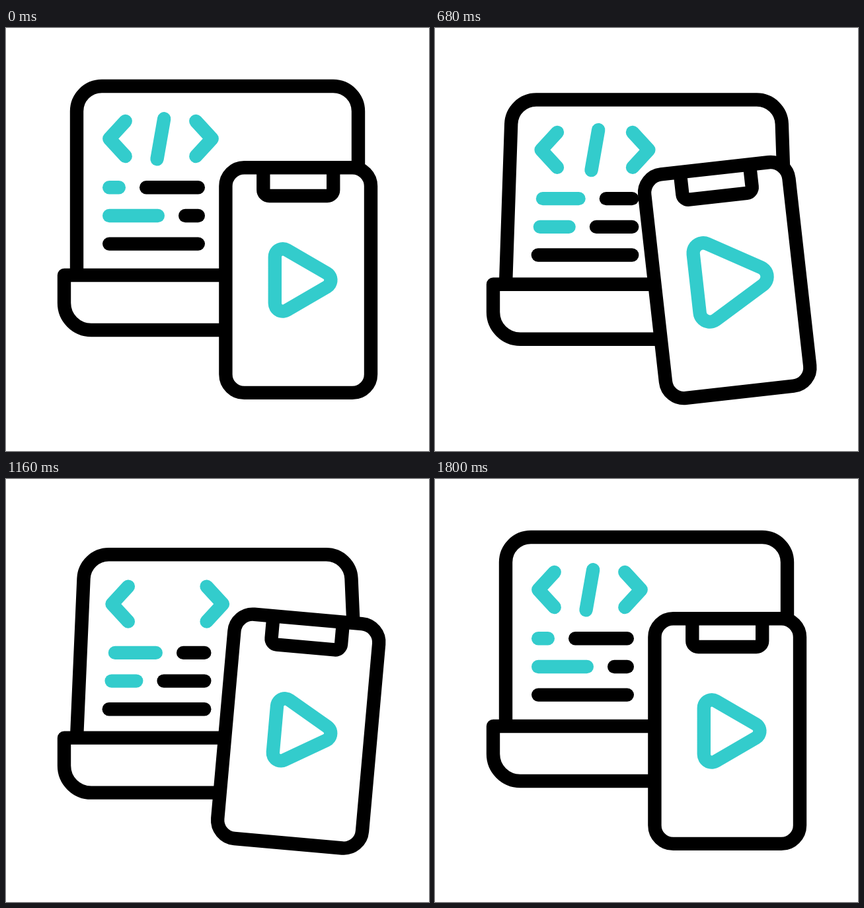
Write an HTML page with a canvas that moves like this. It is 640 by 640 pixels and loops after 2 s.

```html
<!DOCTYPE html>
<html lang="en">
<head>
<meta charset="utf-8">
<title>Code on laptop and phone</title>
<style>
  html, body { margin: 0; height: 100%; overflow: hidden; background: #fff; }
  canvas { display: block; width: 100vmin; height: 100vmin; }
</style>
</head>
<body>
<canvas id="stage" width="640" height="640"></canvas>
<script>
const ctx = document.getElementById('stage').getContext('2d');
const LOOP = 2000, STEP = 40, WEIGHT = 20.4;
const BLACK = '#000', TEAL = '#33cccc', WHITE = '#fff';

const smooth = u => u * u * (3 - 2 * u);
const smoother = u => u * u * u * (10 - 15 * u + 6 * u * u);

// Keyframes are [time, value] pairs, eased between neighbours.
const tiltKeys = [[170, 0], [985, 1], [1800, 0]];
const textKeys = [[140, 0], [970, 1], [1800, 0]];
const swingKeys = [[120, 0], [370, 8], [730, -7.2], [1070, 7.2], [1320, 0]];
const playKeys = [[120, 1], [500, 1.32], [540, 1.32], [1100, 1]];
const slashKeys = [[880, 1], [1080, 0], [1200, 0], [1400, 1]];

function track(keys, t, ease) {
  const next = keys.findIndex(key => t < key[0]);
  if (next === 0) return keys[0][1];
  if (next < 0) return keys[keys.length - 1][1];
  const [t0, a] = keys[next - 1], [t1, b] = keys[next];
  return a + (b - a) * ease((t - t0) / (t1 - t0));
}

function stroke(color, width = WEIGHT) {
  ctx.strokeStyle = color;
  ctx.lineWidth = width;
  ctx.stroke();
}

function polyline(color, ...points) {
  ctx.beginPath();
  points.forEach(([x, y]) => ctx.lineTo(x, y));
  stroke(color);
}

// A round-capped bar given by its outer left and right edges.
function bar(color, left, right, y) {
  const cap = WEIGHT / 2;
  polyline(color, [left + cap, y], [right - cap, y]);
}

function drawLaptop(tilt) {
  const hinge = 374 + 19 * tilt, top = 88 + 28.3 * tilt, lean = 13 * tilt;
  ctx.lineCap = 'butt';
  ctx.beginPath();
  ctx.moveTo(107, hinge);
  ctx.arcTo(107 + lean, top, 320, top, 38);
  ctx.arcTo(533 - lean, top, 533, hinge, 38);
  ctx.lineTo(533, hinge);
  stroke(BLACK);

  ctx.beginPath();
  ctx.moveTo(345, hinge);
  ctx.lineTo(88, hinge);
  ctx.arcTo(88, hinge + 83, 345, hinge + 83, 41);
  ctx.lineTo(345, hinge + 83);
  stroke(BLACK);
}

function drawCode(tilt, shift, slash) {
  const dy = 23.2 * tilt, dx = 11 * tilt, spread = 7 * tilt * tilt;
  const right = 301 + 10.2 * tilt;
  ctx.lineCap = 'round';

  const chevron = (x, tip) => polyline(TEAL,
    [x, 141 + dy], [x + tip, 167.5 + dy], [x, 194 + dy]);
  chevron(180.7 + dx - spread, -24.4);
  chevron(287.3 + dx + spread, 24.4);
  if (slash > 0) {
    polyline(TEAL, [228.5 + dx, 198.3 + dy],
      [228.5 + 10.7 * slash + dx, 198.3 - 61 * slash + dy]);
  }

  bar(TEAL, 146 + 9.4 * tilt, 181 + 61 * shift, 241.3 + dy);
  bar(BLACK, 202 + 61 * shift, right, 241.3 + dy);
  bar(TEAL, 146 + 3.7 * tilt, 240 - 35.5 * shift, 284 + dy);
  bar(BLACK, 261 - 35.5 * shift, right, 284 + dy);
  bar(BLACK, 146 - 0.5 * tilt, right, 326.6 + dy);
}

function drawPlay(scale) {
  const point = (x, y) => ctx.lineTo(449 + x * scale, 381.4 + y * scale);
  ctx.beginPath();
  point(-30.2, -35.2);
  point(30.4, 0);
  point(-30.2, 35.2);
  ctx.closePath();
  // Two wide strokes leave a ring of constant weight.
  stroke(TEAL, 24 * scale + WEIGHT);
  ctx.fillStyle = WHITE;
  ctx.fill();
  stroke(WHITE, 24 * scale - WEIGHT);
}

function drawPhone(degrees, playScale) {
  ctx.save();
  ctx.translate(442.2, 381.5);
  ctx.rotate(degrees * Math.PI / 180);
  ctx.translate(-442.2, -381.5);
  ctx.lineCap = 'butt';

  ctx.beginPath();
  ctx.roundRect(332.4, 211.3, 219.6, 340.6, 28);
  ctx.fillStyle = WHITE;
  ctx.fill();
  stroke(BLACK);

  ctx.beginPath();
  ctx.moveTo(389.3, 211);
  ctx.arcTo(389.3, 254, 442, 254, 9);
  ctx.arcTo(495.2, 254, 495.2, 211, 9);
  ctx.lineTo(495.2, 211);
  stroke(BLACK);

  drawPlay(playScale);
  ctx.restore();
}

function draw(now) {
  const t = Math.floor(now % LOOP / STEP) * STEP;
  const tilt = track(tiltKeys, t, smoother);
  ctx.fillStyle = WHITE;
  ctx.fillRect(0, 0, 640, 640);
  ctx.lineJoin = 'round';
  drawLaptop(tilt);
  drawCode(tilt, track(textKeys, t, smoother), track(slashKeys, t, smooth));
  drawPhone(track(swingKeys, t, smooth), track(playKeys, t, smooth));
}

const start = performance.now();
function frame() {
  draw(performance.now() - start);
  requestAnimationFrame(frame);
}
frame();
</script>
</body>
</html>
```
